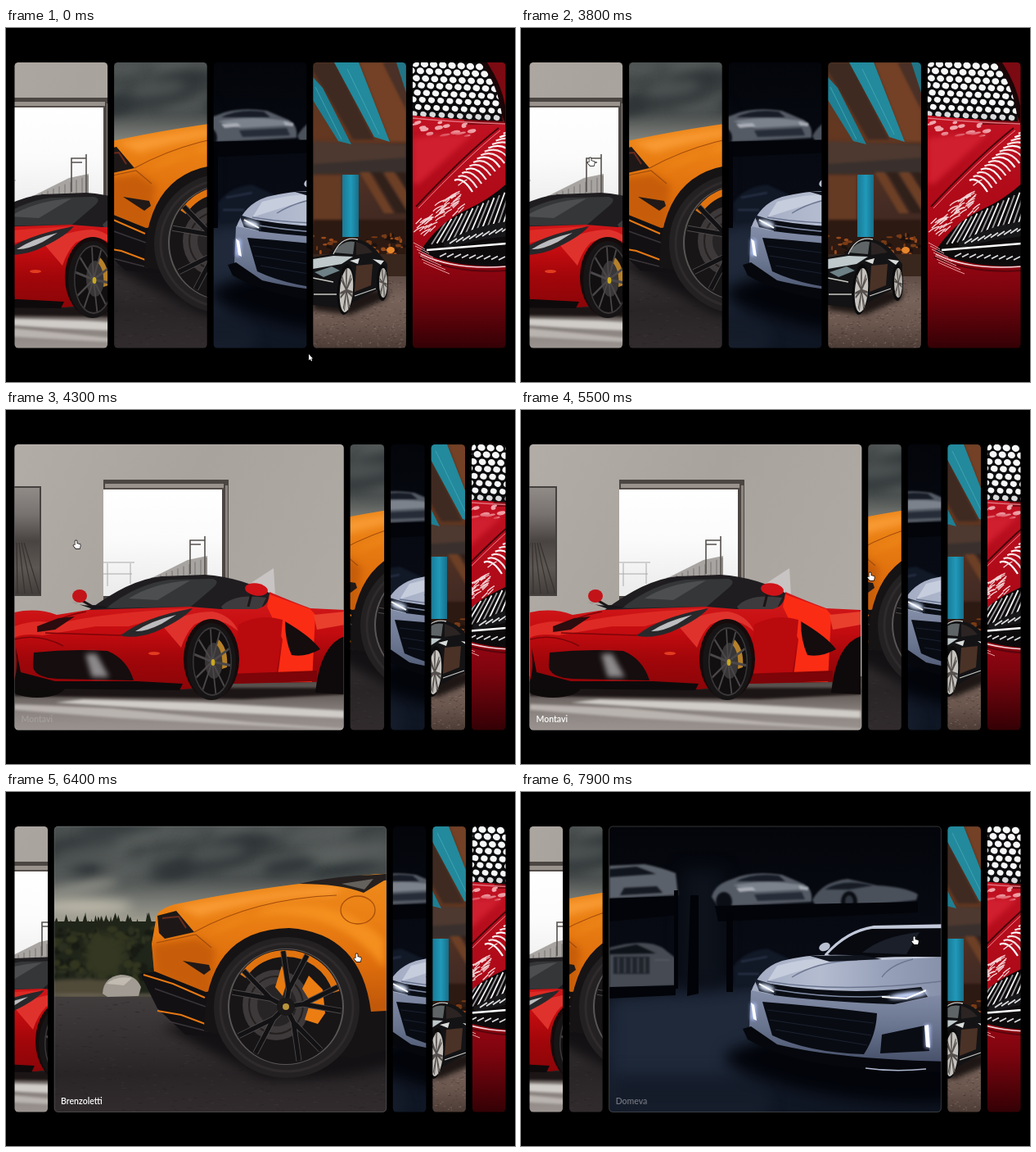
Animation of 622x432 px, one loop 8 s. Source, as an HTML page with a canvas:

```html
<!DOCTYPE html>
<html lang="en">
<head>
<meta charset="utf-8">
<title>Expanding cards</title>
<style>
html, body { margin: 0; width: 100%; height: 100%; overflow: hidden; background: #000; }
canvas { display: block; }
</style>
</head>
<body>
<canvas id="stage" width="622" height="432"></canvas>
<script>
const W = 622, H = 432, LOOP = 8000, STEP = 100;
const LEFT = 10.5, TOP = 42, TALL = 348.5, SPACE = 600, GAP = 8;
const stage = document.getElementById('stage').getContext('2d');
let g;

// ---- drawing helpers ----
function shape(fill, d) { g.fillStyle = fill; g.fill(new Path2D(d)); }
function line(color, width, d) {
  g.strokeStyle = color; g.lineWidth = width; g.stroke(new Path2D(d));
}
function box(fill, x, y, w, h) { g.fillStyle = fill; g.fillRect(x, y, w, h); }
function oval(fill, x, y, rx, ry, turn = 0) {
  g.fillStyle = fill;
  g.beginPath(); g.ellipse(x, y, rx, ry, turn, 0, 7); g.fill();
}
function ring(color, width, x, y, rx, ry, from = 0, to = 7) {
  g.strokeStyle = color; g.lineWidth = width;
  g.beginPath(); g.ellipse(x, y, rx, ry, 0, from, to); g.stroke();
}
function fade(x0, y0, x1, y1, ...colors) {
  const f = g.createLinearGradient(x0, y0, x1, y1);
  colors.forEach((c, i) => f.addColorStop(i / (colors.length - 1), c));
  return f;
}
function soft(px, draw) { g.save(); g.filter = `blur(${px}px)`; draw(); g.restore(); }
function within(d, draw) { g.save(); g.clip(new Path2D(d)); draw(); g.restore(); }
function seeded(s) { return () => (s = (s * 16807) % 2147483647) / 2147483647; }

// paired spokes that fork outwards, squeezed to an ellipse
function spokes(x, y, rx, ry, n, start, spread, width, color, fork = 0) {
  g.save(); g.translate(x, y); g.scale(rx, ry);
  g.strokeStyle = color; g.lineWidth = width; g.beginPath();
  for (let i = 0; i < n; i++) for (const s of [-spread, spread]) {
    const a = start + i * 2 * Math.PI / n;
    g.moveTo(0, 0);
    g.lineTo(Math.cos(a) * fork, Math.sin(a) * fork);
    g.lineTo(Math.cos(a + s) * .97, Math.sin(a + s) * .97);
  }
  g.stroke(); g.restore();
}

// ---- scenes ----
function showroom() {
  box(fade(0, 42, 414, 240, '#b3ada7', '#a9a39d', '#b0aaa4'), 0, 0, W, H);
  box('#45413f', 0, 93, 43, 134);
  box(fade(0, 95, 0, 225, '#908b87', '#77726f', '#494442', '#5d5753', '#423d3a'), 0, 95, 41, 130);
  for (let i = 0; i < 5; i++) line('#37322f', 1.2, `M${10 + i * 3} 162L${5 + i * 9} 224`);
  // window
  box('#4c4643', 119, 85, 153, 150);
  box('#99928c', 121, 90, 145, 6);
  box('#544e4a', 121, 95, 145, 2);
  box(fade(0, 97, 0, 220, '#ffffff', '#fbfbfb', '#ececec'), 119, 97, 145, 130);
  box('#8b847f', 268, 92, 3, 140);
  line('#aaa', 1, 'M119 186H157M119 200H154M124 187V215M152 187V212');
  shape('#a7a4a1', 'M176 206L222 183L246 178V215H176Z');
  for (let x = 182; x < 246; x += 7) line('#77736f', 1, `M${x} ${204 - (x - 182) * .38}V210`);
  line('#55504d', 1.6, 'M225 200V159H243V202M225 164H238M243 154V200');
  shape('#c8c4c3', 'M327 193L298 212L330 243L327 193Z');
  // floor
  box(fade(0, 330, 0, 391, '#514a46', '#6a635f', '#8c8581', '#9a938f'), 0, 325, W, 70);
  soft(1.5, () => {
    shape('#d0ccc8', 'M95 353L240 357L414 367V376L200 366L60 357Z');
    shape('#bab4b0', 'M10 359L130 364L300 381L414 389V391L140 376L10 366Z');
    shape('#1c1515', 'M10 339H414V347L290 353L10 349Z');
  });
  // cabin
  shape('#1f1d20', 'M100 245Q150 207 190 203L243 201Q288 204 327 226L318 246L230 252Z');
  shape('#343638', 'M122 242Q160 212 200 207L252 206Q262 208 254 216Q240 228 226 240Z');
  shape('#4c4e50', 'M150 230Q180 211 225 208L185 232Z');
  shape('#3d3b3d', 'M263 240Q278 223 318 229L311 244L266 245Z');
  // body
  oval('#0d0a0a', 38, 338, 34, 13);
  shape(fade(0, 235, 0, 340, '#d0181a', '#c40c10', '#a0060a', '#8c0508'),
    'M10 247Q38 241 62 250L100 244L224 240L262 243L306 243Q322 240 322 222Q350 234 372 242L414 244V322L380 332L272 334L216 341L160 334L10 337Z');
  shape('#de2a24', 'M62 261Q120 247 226 242Q200 250 150 264L110 264L45 275Q20 272 10 278V264Q40 254 62 261Z');
  line('#7c0509', 1.5, 'M42 270Q60 253 98 246M48 272L140 275Q190 260 225 243M10 280Q40 272 70 288');
  shape('#e0322c', 'M190 262Q225 246 252 246Q275 250 284 270Q258 248 230 262Q220 272 214 290Z');
  shape('#2c0c0e', 'M38 264L64 254L84 252L60 268L38 271Z');
  shape('#150d0e', 'M34 296Q80 291 124 294Q148 304 156 330L62 328Q33 326 33 312Z');
  soft(3, () => shape('#8d8a8c', 'M97 298L110 297L126 326L105 326Z'));
  shape('#0e0a0b', 'M10 330Q15 316 12 290L18 320L60 331L160 331L216 334L212 342L10 340Z');
  shape('#28282b', 'M142 274Q168 253 228 242Q216 256 182 271Q160 279 142 276Z');
  shape('#bdbdc0', 'M158 270Q178 257 208 250L190 261Q170 271 158 270Z');
  oval('#e23c20', 181, 297, 7, 2);
  // door and flank
  shape('#fb2c14', 'M322 225L372 243L378 250L374 332H331L338 280L319 240Z');
  shape('#b90a0e', 'M284 262Q310 248 338 256L334 300L329 330H280Z');
  shape('#e9402e', 'M376 250L414 246V262L380 268Z');
  shape('#140c0d', 'M341 258Q372 276 384 292Q366 302 349 299Q341 282 341 258Z');
  shape('#7d0408', 'M272 322L380 318V331L272 334Z');
  shape('#0e090a', 'M414 276Q384 286 378 345L414 347Z');
  // wheel and mirrors
  oval('#160a0b', 251, 304, 34, 49);
  oval('#161415', 251, 307, 30, 47);
  oval('#3b3739', 252, 307, 24, 42);
  oval('#110f10', 252, 307, 22.5, 40);
  oval('#393637', 254, 306, 11, 22);
  shape('#b5802a', 'M260 280Q272 292 270 314L264 316Q266 296 257 286Z');
  spokes(252, 307, 23, 41, 5, -1.4, .26, .075, '#4b4749');
  oval('#c9a81f', 253, 308, 2.4, 4);
  line('#1b1416', 3, 'M296 240L300 224M92 232L106 240');
  oval('#cf1318', 306, 219, 14, 7.5, .15);
  oval('#c21418', 90, 227, 9, 8);
  shape('#18161a', 'M80 234Q94 240 108 238L128 241L106 243Z');
}

function roadside() {
  box(fade(0, 42, 0, 165, '#4c5151', '#3d4243', '#474c4c', '#7c7e78', '#aaa798'), 0, 0, W, 260);
  const r = seeded(77);
  soft(7, () => {
    for (let i = 0; i < 34; i++) {
      const y = 45 + r() * 62;
      oval(r() < .55 ? '#2f3537' : '#62686588', 40 + r() * 430, y, 20 + r() * 36, 5 + r() * 8, -.15);
    }
    oval('#8d8e86', 85, 118, 50, 8, -.2);
    oval('#bdb9aa', 90, 140, 60, 9);
  });
  // trees
  box('#20251a', 0, 158, 230, 92);
  for (let i = 0; i < 70; i++) {
    const x = 20 + r() * 190, y = 149 + r() * 14, w = 3 + r() * 4;
    shape('#20251a', `M${x - w} ${y + 14}L${x} ${y - 4}L${x + w} ${y + 14}Z`);
  }
  soft(1, () => {
    for (let i = 0; i < 150; i++)
      oval(['#2b3020', '#171b13', '#32361f'][i % 3], 50 + r() * 140, 165 + r() * 65, 2 + r() * 5, 2 + r() * 4);
  });
  soft(5, () => oval('#343822', 116, 200, 24, 28));
  soft(2, () => {
    oval('#504a39', 90, 239, 60, 11);
    box('#7e7465', 0, 247, 240, 3);
  });
  shape('#a19b93', 'M114 246Q115 226 136 223Q155 223 161 238L158 249L120 250Z');
  shape('#c1bbb1', 'M119 234Q130 224 150 227L140 236Z');
  // road
  box(fade(0, 250, 0, 391, '#423d3d', '#353032', '#292527', '#312b2d'), 0, 250, W, 145);
  for (let i = 0; i < 500; i++)
    box(i % 2 ? '#4a444644' : '#1b181a44', 30 + r() * 450, 254 + r() * 136, 2 + r() * 4, 1);
  soft(7, () => shape('#131113', 'M185 286L480 270V330Q400 355 310 350Z'));
  // body
  const body = 'M180 151Q186 139 213 135Q300 117 400 107Q430 100 480 99V268H300L238 252L177 220L174 185Z';
  within(body, () => {
    box(fade(0, 105, 0, 260, '#ee8a1c', '#ea7f14', '#df6e0c', '#c2590a'), 150, 90, 340, 190);
    soft(4, () => {
      shape('#f89a33', 'M205 140Q310 120 410 115L395 126Q320 126 232 152Z');
      shape('#c75d0a', 'M175 186L230 178L252 192L242 250L178 220Z');
      shape('#f4901f', 'M240 176Q290 142 350 150Q415 158 458 215V180Q400 126 320 141Z');
    });
  });
  line('#a24c0b', 1.2, 'M226 171Q300 130 400 126M180 184L228 174L247 190');
  shape('#25201f', 'M354 112Q400 102 448 101L480 98V106L458 108L433 123Q405 112 354 112Z');
  shape('#64605c', 'M406 112L445 106L434 119Z');
  ring('#a94f0a', 1.3, 426, 144, 21, 17);
  shape('#1d1817', 'M181 151L204 145L226 171L190 179L183 172Z');
  line('#6c2b1d', 2, 'M187 154L207 152L216 166');
  shape('#211917', 'M212 206L244 211L246 217L238 223Z');
  shape('#121012', 'M160 222L178 219L240 244L270 240V300L215 296L181 264Z');
  line('#e57814', 2, 'M164 223L200 234L239 251M181 267L210 272L242 284');
  line('#39343a', 1.5, 'M178 240L240 262M195 280L242 292');
  // wheel
  shape('#161315', 'M238 292Q238 168 342 166Q430 172 442 268L480 266V310L420 325Z');
  oval('#242122', 339, 263, 89, 86);
  ring('#2f2b2c', 3, 339, 263, 81, 78);
  oval('#5a5555', 338, 262, 71, 71);
  oval('#171516', 338, 262, 69, 70);
  ring('#e0730f', 8, 338, 262, 64, 65, 3.75, 6);
  oval('#3d3839', 326, 260, 41, 43);
  ring('#24201f', 2, 326, 260, 33, 35);
  oval('#272425', 327, 260, 24, 26);
  shape('#ec7d12', 'M358 240L366 224L383 241L386 270L377 283L361 278L368 256Z');
  shape('#e77a10', 'M325 238L333 212L340 230L334 249Z');
  spokes(338, 262, 70, 70, 5, -1.4, .22, .1, '#4f4a4a', .3);
  spokes(338, 262, 70, 70, 5, -1.4, .22, .075, '#121113', .3);
  oval('#1a1819', 338, 262, 11, 11);
  oval('#b8943a', 338, 262, 4, 4);
}

function garage() {
  box(fade(0, 42, 0, 391, '#03050a', '#060910', '#080b14', '#151d2c', '#0f1623'), 0, 0, W, H);
  soft(10, () => {
    shape('#1f293a', 'M107 250L300 236L330 300L260 330L300 391H107Z');
    shape('#141b29', 'M107 345H300V391H107Z');
    box('#0d121b', 196, 95, 50, 140);
  });
  // parked cars
  soft(1, () => {
    shape('#5b616a', 'M107 90L150 88Q170 92 188 99L191 126L107 130Z');
    shape('#10141c', 'M107 94L140 91L164 100L107 104Z');
    shape('#151922', 'M125 117L165 115L172 123L120 126Z');
    shape('#555b65', 'M232 128Q236 112 258 106Q280 96 318 101L344 112Q356 118 354 134L300 137L240 140Z');
    shape('#171c26', 'M262 109Q282 98 314 102L322 109Z');
    shape('#7c828c', 'M258 114Q300 106 346 114L340 119L286 122Z');
    shape('#272d38', 'M284 125L342 122L346 131L288 133Z');
    shape('#a8adb5', 'M262 117L282 116L286 120L266 122ZM338 114L350 116L350 120L340 119Z');
    oval('#0b0e15', 247, 134, 10, 12);
    shape('#4b515b', 'M355 132Q366 110 398 106L434 114Q470 116 484 125L482 132L412 140L362 144Z');
    shape('#161b24', 'M370 119Q392 105 430 114L400 119Z');
    oval('#0a0d13', 400, 134, 10, 13);
    oval('#30363f', 400, 134, 5, 8);
    shape('#464b53', 'M107 190Q150 178 172 190L187 202V236L107 240Z');
    shape('#0d1118', 'M107 193L140 186L164 197L107 198Z');
    shape('#20242c', 'M112 201H156V222H112Z');
    line('#5c626a', 1.2, 'M118 202V221M126 202V221M134 202V221M142 202V221M150 202V221M162 205H181');
    shape('#111826', 'M258 214Q270 194 300 191L328 204L300 236L260 238Z');
    line('#2b364b', 2, 'M268 207L300 201M264 222H290');
  });
  shape('#020409', 'M107 130L191 127V150L107 158ZM236 139L484 134V147L330 154L240 158ZM107 238L188 236V248L107 252Z');
  shape('#020308', 'M206 126H216V246L202 249ZM250 146H258V244H250ZM186 120H191V240H186Z');
  // front car
  soft(9, () => shape('#02040a', 'M250 318L300 300L530 330V380Q360 385 250 330Z'));
  shape('#c2c9da', 'M370 198Q396 168 430 163L530 161V210H370Z');
  shape('#07090f', 'M374 198Q398 172 428 167L530 166V202Q440 199 398 206Z');
  shape('#1a1f2a', 'M416 196Q440 176 486 171L470 198Z');
  oval('#b9c0d2', 370, 189, 7, 5, -.4);
  shape(fade(290, 0, 513, 0, '#a4adc4', '#b4bcd0', '#98a2ba', '#8891aa'),
    'M280 244Q290 215 318 206Q350 197 400 199L440 205L530 201V262L420 268L300 260Z');
  shape('#c6cddd', 'M312 212Q350 201 392 203Q352 214 300 231Z');
  line('#6c7690', 1.3, 'M330 226Q360 207 410 205M440 226Q450 211 478 204M300 231Q390 246 513 231');
  shape('#10141d', 'M352 200L416 199L440 204L376 207Z');
  shape(fade(0, 240, 0, 330, '#858fa9', '#6a7590', '#465069'), 'M280 242L310 248L440 256L530 246V331Q410 338 318 316L278 288Z');
  shape('#0a0d14', 'M304 234Q380 247 458 241L488 238L496 250L455 259Q370 256 308 248Z');
  line('#7d88a2', 1.5, 'M308 241Q380 253 450 249');
  shape('#080b12', 'M294 256Q370 262 434 270Q433 297 418 320Q350 318 306 297Z');
  line('#1a2130', 1, 'M300 266L430 282M303 278L427 297M310 290L422 309');
  shape('#090c13', 'M440 296L492 285L498 316L438 319Z');
  shape('#161d2c', 'M284 228L308 235L311 248L290 243Z');
  soft(2, () => { oval('#dfeaff', 299, 239, 10, 4, .3); oval('#c9d8ff', 472, 248, 24, 4, -.12); });
  line('#fff', 2, 'M290 234L308 244M440 250L470 252L494 242');
  soft(2, () => { box('#b5c8ff', 280, 258, 6, 20); box('#b5c8ff', 493, 284, 6, 28); });
  shape('#fff', 'M280 257L284 260L287 279L283 277ZM492 285L497 284L499 312L494 311Z');
  shape('#05070c', 'M270 289L280 286L312 308Q390 327 530 329V341Q350 345 276 302Z');
  line('#aeb8d0', 1.4, 'M420 337Q455 342 494 338');
}

function underpass() {
  box(fade(0, 42, 0, 300, '#5a3724', '#643720', '#452c24', '#3a2117'), 0, 0, W, H);
  soft(1.5, () => {
    shape('#3f2a21', 'M375 42H402L450 136H424L375 52Z');
    shape('#744126', 'M432 42H462L489 96V138H469Z');
    shape('#4a3026', 'M460 42H478L489 76V100Z');
    box('#39302d', 370, 142, 125, 36);
    shape('#4e3930', 'M375 138L489 143V158L375 166Z');
  });
  shape('#1f7f93', 'M375 60L387 73L422 142L406 138L375 88Z');
  shape('#23899c', 'M401 42H431L469 139L450 133Z');
  shape('#217586', 'M477 42H489V79Z');
  line('#3ea5b4', 1, 'M417 50L456 130M378 72L410 136');
  soft(1.5, () => {
    shape('#663b24', 'M375 180H410V240H375Z');
    for (let i = 0; i < 4; i++)
      shape(i % 2 ? '#30201a' : '#6d4026', `M${432 + i * 15} 176H${444 + i * 15}L${474 + i * 17} 226H${462 + i * 15}Z`);
    box('#2c1912', 375, 234, 114, 46);
  });
  box(fade(411, 0, 432, 0, '#1a7995', '#2099b9', '#166a84'), 411, 179, 20, 76);
  const r = seeded(31);
  for (let i = 0; i < 60; i++)
    oval(['#7a3c16', '#1c110d', '#9a4a1a'][i % 3], 375 + r() * 114, 252 + r() * 26, 1 + r() * 3, 1 + r() * 2);
  oval('#e8872b', 470, 271, 5, 4);
  shape('#39261d', 'M375 276H489V310H375Z');
  box(fade(0, 300, 0, 391, '#5c4a43', '#77635a', '#6b574e', '#4c3c36'), 375, 303, 114, 90);
  for (let i = 0; i < 420; i++)
    box(i % 2 ? '#94807677' : '#3c2e2977', 375 + r() * 114, 308 + r() * 82, 1 + r() * 2, 1);
  soft(3, () => shape('#1d1614', 'M375 322H412L466 318V330L420 350L375 344Z'));
  // car
  shape('#131315', 'M375 280L396 276Q410 252 428 257Q446 262 454 273L466 288V314L440 326L412 342L375 338Z');
  shape('#5f6566', 'M400 274Q412 258 426 261L424 276Z');
  shape('#2b2422', 'M428 261Q440 264 448 274L428 277Z');
  shape('#bfc9cb', 'M375 282L400 278L424 279L410 288L375 294Z');
  shape('#6d8186', 'M377 298L398 291L408 296L388 304Z');
  shape('#d8dcda', 'M420 284L432 281L430 288ZM448 282L462 284L458 289Z');
  shape('#4b3226', 'M428 290L448 288L446 314L426 322Z');
  line('#c8c9c4', 1.3, 'M375 305L400 310M376 325H404M426 327L452 318M400 276Q410 253 430 258');
  oval('#0b0b0c', 415, 319, 10, 31, .08);
  oval('#c6c3be', 416, 320, 8, 27, .08);
  spokes(416, 320, 8, 27, 7, .2, .1, .11, '#55504d');
  oval('#0b0b0c', 460, 311, 7, 22);
  oval('#b9b5af', 461, 311, 5, 18);
  spokes(461, 311, 5, 18, 6, .2, .1, .12, '#55504d');
}

function closeUp() {
  box(fade(0, 108, 0, 391, '#c11222', '#b30c1b', '#ab0816', '#7c040e', '#330105'), 0, 0, W, H);
  // dotted glass
  box('#7c0a12', 560, 38, 60, 80);
  shape('#1a0507', 'M578 42H588Q606 70 610 95V116Z');
  within('M490 38H576Q602 66 607 114Q550 112 490 106Z', () => {
    box('#0c0c0e', 490, 38, 125, 80);
    for (let j = 0; j < 9; j++) for (let i = 0; i < 13; i++) {
      const x = 489 + i * 11.2 + (j % 2) * 5.6 + j * .6, y = 43 + j * 8.8 + i * .55;
      oval(j > 6 ? '#d8dadb' : '#f6f7f7', x, y, 4.7 - j * .12, 4 - j * .1, .3);
    }
  });
  line('#e3707b', 1.5, 'M497 110Q550 115 610 117');
  const r = seeded(9);
  for (let i = 0; i < 16; i++)
    oval('#f0a5ab', 500 + r() * 80, 114 + r() * 18, 2 + r() * 5, 1 + r() * 1.5, -.2);
  soft(3, () => shape('#d01f2f', 'M497 135Q530 128 570 130L505 190H497Z'));
  // reflections along the crease
  for (let i = 0; i < 15; i++) {
    const x = 548 + i * 4.6, y = 186 - i * 4.4;
    line(i % 3 ? '#f7e3e3' : '#fff', 2.2, `M${x} ${y}q${10 + i} ${-5 - i * .3} ${22 + i} ${14 - i * .6}`);
  }
  for (let i = 0; i < 44; i++) {
    const x = 498 + r() * 55, y = 248 - (x - 498) * .85 + r() * 34 - 10;
    line('#f3d5d6', 1.3, `M${x} ${y}q5 -5 ${6 + r() * 8} -7`);
  }
  line('#46050b', 2, 'M602 122Q560 155 501 218');
  line('#ef8991', 1, 'M604 125Q564 157 504 220');
  // lamp
  const lamp = 'M506 273Q528 238 562 222Q590 210 614 188V290Q550 294 506 273Z';
  shape('#0d0a0c', lamp);
  within(lamp, () => {
    for (let i = 0; i < 16; i++) {
      const x = 520 + i * 6.5;
      line(i % 2 ? '#f5f5f5' : '#98979a', 1.8, `M${x} ${264 - i * 1.2}L${x + 18} ${236 - i * 3.2}`);
    }
    shape('#17171a', 'M535 262Q575 240 614 236V254Q570 258 535 270Z');
    for (let i = 0; i < 9; i++)
      line('#dcdcde', 1.8, `M${542 + i * 8} ${263 - i * 1.8}l9 -6M${530 + i * 9} ${279 + i * .5}l8 -4`);
    line('#fff', 2.5, 'M514 271Q552 268 612 263');
  });
  line('#f2d8da', 1.6, 'M507 276Q548 296 612 291');
  line('#5a040c', 2, 'M505 279Q548 300 612 296');
  for (let i = 0; i < 7; i++)
    line('#e9a0a6', 1, `M${498 + i * 2} ${262 + i * 4}q8 4 ${14 + i * 3} ${8 + i}`);
}

const cards = [
  { draw: showroom, ref: 212, name: 'Montavi' },
  { draw: roadside, ref: 258, name: 'Brenzoletti' },
  { draw: garage, ref: 310, name: 'Domeva' },
  { draw: underpass, ref: 432, name: '' },
  { draw: closeUp, ref: 553.6, name: '' }
];
for (const c of cards) {
  c.art = document.createElement('canvas');
  c.art.width = W; c.art.height = H;
  g = c.art.getContext('2d');
  c.draw();
}

// ---- timing ----
const clicks = [{ at: 3810, card: 0 }, { at: 5635, card: 1 }, { at: 7348, card: 2 }];
const path = [
  [0, 370, 398], [1000, 370, 398], [1300, 367, 405], [1800, 340, 290], [2200, 318, 184],
  [2700, 230, 170], [3600, 84, 158], [4300, 86, 159], [4700, 88, 160], [5500, 427, 198],
  [6300, 427, 198], [7200, 481, 176], [8000, 481, 176]
];

// cubic-bezier(.42, 0, 1, 1)
function easeIn(x) {
  if (x <= 0) return 0;
  if (x >= 1) return 1;
  let lo = 0, hi = 1;
  for (let i = 0; i < 24; i++) {
    const s = (lo + hi) / 2, q = 1 - s;
    if (1.26 * q * q * s + 3 * q * s * s + s * s * s < x) lo = s; else hi = s;
  }
  return 3 * (1 - lo) * lo * lo + lo ** 3;
}

// each click opens its card and closes whatever was open before
function openness(t) {
  let open = cards.map(() => 0);
  for (const { at, card } of clicks) {
    const p = easeIn((t - at) / 500);
    open = open.map((o, i) => i === card ? p : o * (1 - p));
  }
  return open;
}

function pointerAt(t) {
  const i = path.findIndex(k => k[0] > t);
  const [t0, x0, y0] = path[i - 1], [t1, x1, y1] = path[i];
  let p = (t - t0) / (t1 - t0);
  if (t1 - t0 > 700) p = p * p * (3 - 2 * p);
  return [x0 + (x1 - x0) * p, y0 + (y1 - y0) * p];
}

function pointer(x, y, hand) {
  g.save();
  g.translate(Math.round(x), Math.round(y));
  const d = hand
    ? 'M-1.5 1Q-.5 -.6 .6 1V4L4.6 5Q5.4 7 4 10H-.6L-3.6 6.4Q-3 5 -1.5 6Z'
    : 'M0 0V7.5L1.8 6L3 8.6L4.2 8L3 5.5H5Z';
  line('#000', 1.4, d);
  shape('#fff', d);
  g.restore();
}

function render(t) {
  g = stage;
  box('#000', 0, 0, W, H);
  const open = openness(t);
  const grow = open.map(o => .5 + 4.5 * o);
  const unit = (SPACE - 4 * GAP) / grow.reduce((a, b) => a + b);
  const active = clicks.filter(c => c.at <= t).pop();
  const [px, py] = pointerAt(t);
  let x = LEFT, hand = false;
  cards.forEach((c, i) => {
    const w = grow[i] * unit;
    g.save();
    g.beginPath(); g.roundRect(x, TOP, w, TALL, 4.5); g.clip();
    g.drawImage(c.art, Math.round(x + w / 2 - c.ref), 0);
    if (active && active.card === i) {
      g.globalAlpha = easeIn((t - active.at - 380) / 300);
      g.font = '600 10.5px Lato, "Open Sans", sans-serif';
      g.fillStyle = '#fff';
      g.fillText(c.name, x + 8, 381);
    }
    g.restore();
    if (open[i]) {
      g.strokeStyle = `rgba(255,255,255,${.2 * open[i]})`; g.lineWidth = 1;
      g.beginPath(); g.roundRect(x, TOP, w, TALL, 4.5); g.stroke();
    }
    if (px > x && px < x + w && py > TOP && py < TOP + TALL) hand = true;
    x += w + GAP;
  });
  pointer(px, py, hand);
}

const begin = performance.now();
function tick(now) {
  const t = Math.max(0, now - begin) % LOOP;
  render(Math.floor(t / STEP) * STEP);
  requestAnimationFrame(tick);
}
render(0);
requestAnimationFrame(tick);
</script>
</body>
</html>
```
